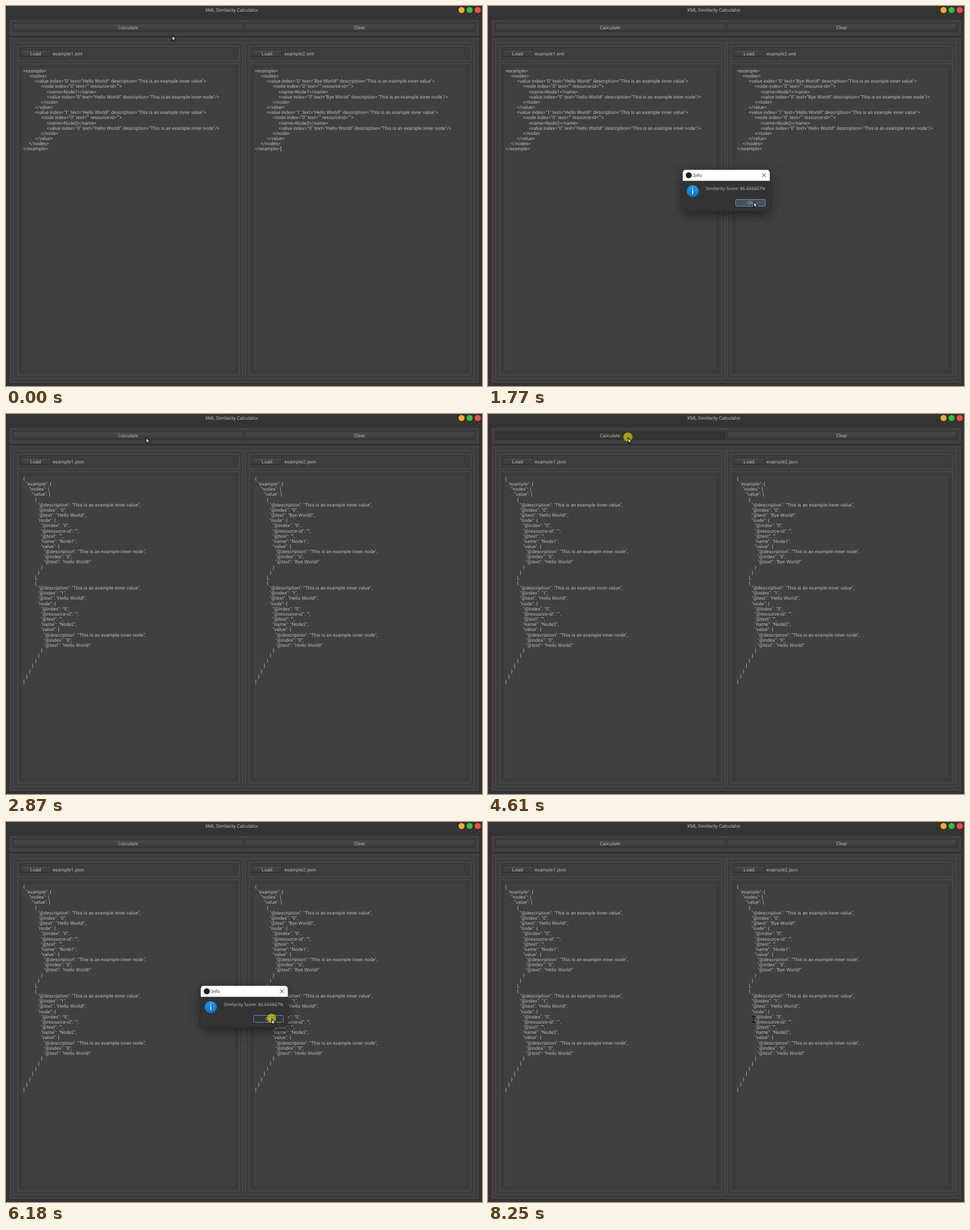
An HTML page that plays this animation: 837 px wide and 669 px high, repeating every 8280 ms.

```html
<!DOCTYPE html>
<html lang="en">
<head>
<meta charset="utf-8">
<title>XML Similarity Calculator</title>
<style>
html, body { margin: 0; width: 100%; height: 100%; overflow: hidden; background: #343434; }
svg { display: block; width: 837px; height: 669px; }
text { font: 8.32px Roboto, sans-serif; fill: #bababa; text-rendering: geometricPrecision; white-space: pre; }
.ui, .json text { letter-spacing: .1px; }
.xml text { letter-spacing: .02px; }
.mid { text-anchor: middle; }
.panel { fill: #3d3d3d; stroke: #505050; }
.area { fill: #404040; stroke: #333; }
.button { fill: url(#raised); stroke: #2f2f2f; }
.button.down { fill: #343434; stroke: #292929; }
#dialog { transform-origin: 378px 308px; filter: drop-shadow(0 6px 10px rgba(0, 0, 0, .5)); }
#dialog text { font: 7.8px "Noto Sans", sans-serif; letter-spacing: 0; }
#dialog .button { fill: #4a5058; stroke: #5b8fc4; }
#dialog .button.down { fill: #343434; }
</style>
</head>
<body>
<svg viewBox="0 0 837 669">
  <defs>
    <linearGradient id="raised" x2="0" y2="1">
      <stop stop-color="#4a4a4a"/><stop offset="1" stop-color="#393939"/>
    </linearGradient>
    <linearGradient id="blue" x2="0" y2="1">
      <stop stop-color="#1a9bea"/><stop offset="1" stop-color="#0873c8"/>
    </linearGradient>
  </defs>
  <g id="window"></g>
  <g id="xml" class="xml"></g>
  <g id="json" class="json"></g>
  <path id="caret" d="M483.5 247V256" stroke="#c4c4c4"/>
  <g id="dialog">
    <rect x="342.5" y="288.5" width="153" height="72.5" rx="5" fill="#333"/>
    <path d="M342.5 307.7V293.5a5 5 0 0 1 5-5H490.5a5 5 0 0 1 5 5V307.7Z" fill="#fff"/>
    <circle cx="353" cy="298" r="5.3" fill="#1b1f23"/>
    <text x="361" y="301" style="fill:#222">Info</text>
    <path d="M481.7 294.5l7 7m0-7l-7 7" stroke="#222" stroke-width=".9"/>
    <circle cx="360" cy="326" r="10.5" fill="url(#blue)"/>
    <circle cx="360" cy="321.3" r="1.1" fill="#fff"/>
    <path d="M360 324.2V331.6" stroke="#fff" stroke-width="1.6"/>
    <text x="383" y="323.6">Similarity Score: 86.666667%</text>
    <rect id="ok" class="button" x="435.5" y="340.5" width="52" height="12" rx="1"/>
    <text class="mid" x="461.5" y="349.3">OK</text>
  </g>
  <circle id="halo" r="8" fill="#fff600" opacity=".55"/>
  <path id="arrow" d="M.4 .6V10.6L2.7 8.5L4.2 11.9L5.8 11.2L4.4 7.9H7.3Z" fill="#dcdcdc" stroke="#0c0c0c" stroke-width="1.1"/>
  <g id="beam" fill="none" transform="translate(467 347.5)">
    <path d="M-3-6H3M0-6V6M-3 6H3" stroke="#aaa" stroke-width="2.2" opacity=".35"/>
    <path d="M-3-5.5H3M0-5.5V5.5M-3 5.5H3" stroke="#050505" stroke-width="1.4"/>
  </g>
</svg>
<script>
const LOOP = 8280, SHIFT = 407, PITCH = 9.15;
const $ = id => document.getElementById(id);
const esc = s => s.replace(/&/g, "&amp;").replace(/</g, "&lt;");

const rect = (cls, x, y, x2, y2, id = "") =>
  `<rect class="${cls}" id="${id}" x="${x + .5}" y="${y + .5}" width="${x2 - x}" height="${y2 - y}"/>`;
const label = (s, x, y, cls = "ui") => `<text class="${cls}" x="${x}" y="${y}">${esc(s)}</text>`;

function drawWindow() {
  const dots = [[801, "#fbaa28"], [815.3, "#2bc637"], [829.5, "#fa4b4b"]];
  let s = rect("panel", 7, 25, 830, 50) + rect("panel", 7, 57, 830, 662);
  s += rect("button", 13, 31, 416, 44, "calc") + rect("button", 420, 31, 823, 44, "clear");
  s += label("Calculate", 214.5, 40.8, "ui mid") + label("Clear", 622, 40.8, "ui mid");
  s += `<text class="mid" style="font-size:8.4px" x="397" y="10">XML Similarity Calculator</text>`;
  for (const [x, c] of dots) s += `<circle cx="${x}" cy="7" r="5.3" fill="${c}"/>`;
  for (const d of [0, SHIFT]) {
    s += rect("panel", 13 + d, 64, 416 + d, 655) + rect("panel", 20 + d, 70, 410 + d, 96);
    s += rect("panel", 20 + d, 101, 410 + d, 649) + rect("area", 26 + d, 107, 403 + d, 642);
    s += rect("button", 26 + d, 77, 77 + d, 89) + label("Load", 52 + d, 86.6, "ui mid");
  }
  return s;
}

const note = kind => `This is an example inner ${kind}`;

function xmlText(first) {
  const item = (i, word) => {
    const attrs = (n, kind) => `index="${n}" text="${word} World!" description="${note(kind)}"`;
    return `        <value ${attrs(i, "value")}>
            <node index="0" text="" resource-id="">
                <name>Node${i + 1}</name>
                <value ${attrs(0, "node")}/>
            </node>
        </value>`;
  };
  return `<example>
    <nodes>
${item(0, first)}
${item(1, "Hello")}
    </nodes>
</example>`;
}

function jsonText(first) {
  const leaf = (i, word, kind) =>
    ({ "@description": note(kind), "@index": `${i}`, "@text": `${word} World!` });
  const item = (i, word) => ({
    ...leaf(i, word, "value"),
    node: {
      "@index": "0", "@resource-id": "", "@text": "",
      name: `Node${i + 1}`, value: leaf(0, word, "node")
    }
  });
  return JSON.stringify({ example: { nodes: { value: [item(0, first), item(1, "Hello")] } } }, null, 2);
}

function drawFiles(type, make) {
  return ["Hello", "Bye"].map((word, n) => {
    const left = n * (SHIFT + .5);
    const lines = make(word).split("\n").map((line, row) => {
      const indent = line.search(/\S/);
      return label(line.trim(), 30.2 + left + indent * 2.6, 117 + row * PITCH, "");
    });
    return label(`example${n + 1}.${type}`, 82.2 + left, 86.6) + lines.join("");
  }).join("");
}

$("window").innerHTML = drawWindow();
$("xml").innerHTML = drawFiles("xml", xmlText);
$("json").innerHTML = drawFiles("json", jsonText);

// Pointer stops: time, x, y. Equal times make a jump.
const path = [
  [0, 292, 51], [30, 292, 51], [300, 250, 38], [730, 250, 38], [730, 250, 39],
  [1250, 250, 39], [1570, 458, 332], [1770, 467, 344], [1970, 467, 344], [2180, 468, 345],
  [2750, 468, 345], [2750, 270, 46], [2870, 246, 41], [4730, 246, 41], [5040, 457, 332],
  [5120, 457, 332], [5250, 465, 345], [5560, 465, 345], [5620, 467, 346]
];
// Dialog: time, opacity, scale.
const fade = [
  [0, 0, .9], [1180, 0, .9], [1360, 1, 1], [2620, 1, 1], [2740, 0, .93],
  [4660, 0, .9], [4840, 1, 1], [6310, 1, 1], [6420, .2, .947], [6880, .2, .947], [6950, 0, .93]
];
const clicks = [[1000, 1170, "calc"], [2480, 2620, "ok"], [4480, 4650, "calc"], [6180, 6320, "ok"]];

const smooth = u => u * u * (3 - 2 * u);

function at(keys, t) {
  let i = keys.length - 1;
  while (keys[i][0] > t) i--;
  const a = keys[i], b = keys[i + 1] || a;
  const u = b === a ? 0 : smooth((t - a[0]) / (b[0] - a[0]));
  return [1, 2].map(k => a[k] + (b[k] - a[k]) * u);
}

const show = (id, on) => { $(id).style.display = on ? "" : "none"; };

function render(t) {
  const [x, y] = at(path, t), [alpha, scale] = at(fade, t);
  const click = clicks.find(([from, to]) => t >= from && t < to);
  const json = t >= 2750, beam = t >= 6400;

  show("xml", !json);
  show("json", json);
  show("caret", t < 100);
  show("arrow", !beam);
  show("beam", beam);
  $("arrow").setAttribute("transform", `translate(${x} ${y})`);

  show("halo", click);
  $("halo").setAttribute("transform", `translate(${x} ${y - .5})`);
  for (const id of ["calc", "ok"]) $(id).classList.toggle("down", !!click && click[2] === id);

  show("dialog", alpha > 0);
  $("dialog").style.opacity = alpha;
  $("dialog").style.transform = `scale(${scale})`;
}

const start = performance.now();
function tick() {
  render((performance.now() - start) % LOOP);
  requestAnimationFrame(tick);
}
tick();
</script>
</body>
</html>
```
